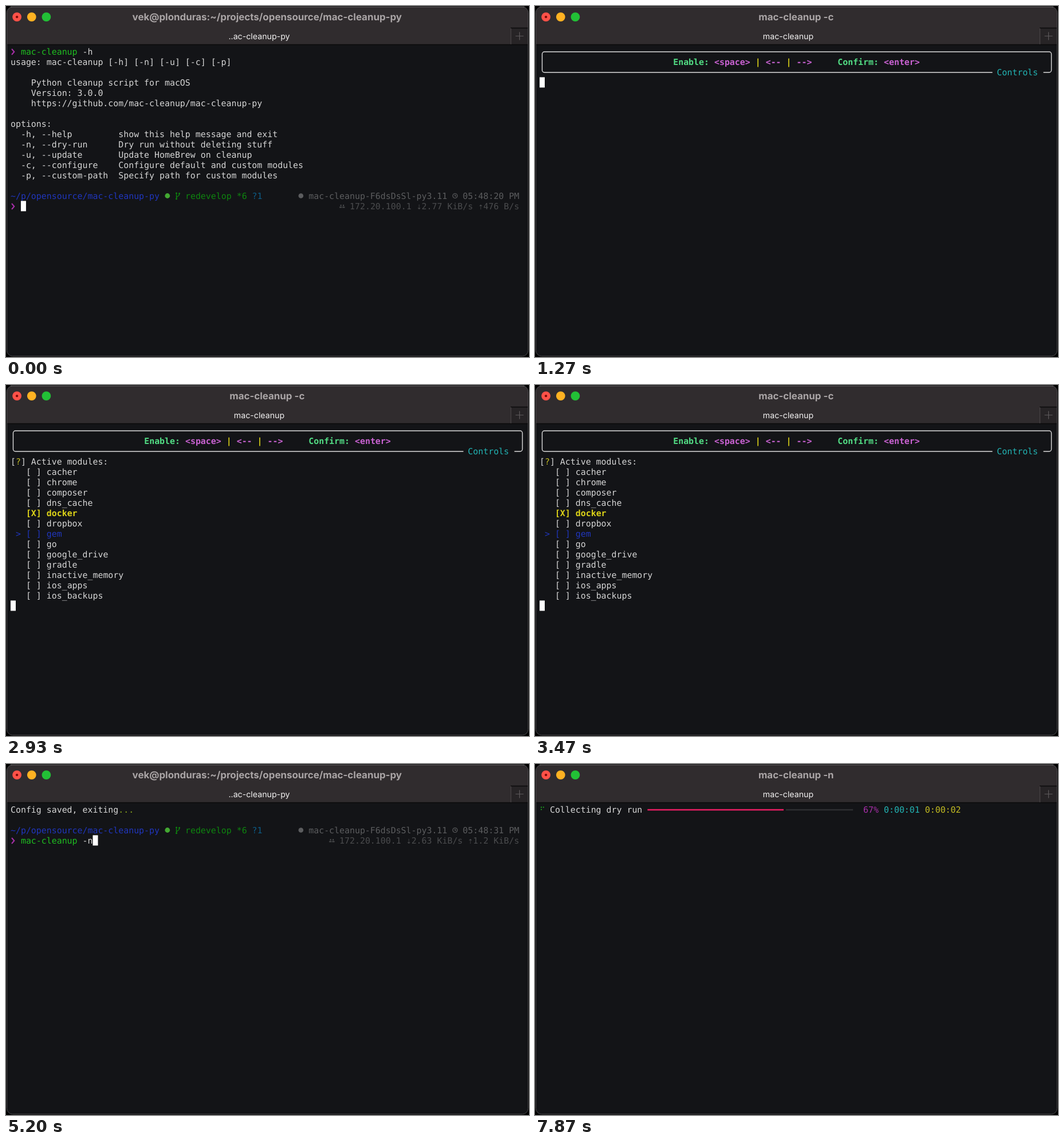
An HTML page that plays this animation: 913 by 613 pixels, repeating every 8 s.

```html
<!DOCTYPE html>
<html lang="en">
<head>
<meta charset="utf-8">
<title>Terminal session</title>
<style>
html, body { margin: 0; width: 100%; height: 100%; overflow: hidden; background: #000; }
svg { display: block; width: 913px; height: 613px; }
text { white-space: pre; text-rendering: geometricPrecision; }
.mono { font: 14.9px "DejaVu Sans Mono", monospace; }
.bold { font-weight: 700; }
.ui { font-family: Inter, sans-serif; text-anchor: middle; }
</style>
</head>
<body>
<svg viewBox="0 0 913 613">
  <rect x="1.5" y="1.5" width="910" height="610" rx="10" fill="#131417"/>
  <path d="M1.5 67V11.5a10 10 0 0 1 10-10H901.5a10 10 0 0 1 10 10V67Z" fill="#302c2e"/>
  <path d="M881.5 38.5H911V67H881.5Z" fill="#272426"/>
  <path d="M2 67.5H911M881 38.5H911" stroke="#0b0a0b" stroke-width="1.4"/>
  <path d="M881.5 39V67" stroke="#4b4749"/>
  <path d="M889.5 52.5H903.5M896.5 45.5V59.5" stroke="#5d595b" stroke-width="1.2"/>
  <rect x="1.5" y="1.5" width="910" height="610" rx="10" fill="none" stroke="#4c4b4d"/>
  <path d="M8 1.5H905" stroke="#6b696a"/>
  <circle cx="19.1" cy="19.1" r="7.9" fill="#ff5148"/>
  <circle cx="19.1" cy="19.1" r="2.2" fill="#7c0c08"/>
  <circle cx="44.8" cy="19.1" r="7.9" fill="#ffb222"/>
  <circle cx="70.4" cy="19.1" r="7.9" fill="#22c036"/>
  <text id="title" class="ui" x="455.8" y="24.6" font-size="16.9" font-weight="700" fill="#aaa5a6"/>
  <text id="tab" class="ui" x="442" y="58" font-size="14.2" fill="#f3f2f2"/>
  <g id="screen" class="mono"></g>
</svg>
<script>
const LOOP = 8000, CELL = 8.97, LINE = 18;
const C = {
  text: '#d6d6d6', gray: '#5c5d5f', dim: '#4b4c4e', blue: '#2036bd', green: '#0e850f',
  cmd: '#1fbd20', magenta: '#a82fa9', teal: '#0d5c87', cyan: '#22b5b5', yellow: '#c4bd22',
  lime: '#52dc84', pink: '#c962d2', gold: '#dcd218'
};
const HOME = ['vek@plonduras:~/projects/opensource/mac-cleanup-py', '..ac-cleanup-py'];
const app = flag => ['mac-cleanup ' + flag, 'mac-cleanup'];
const MODULES = ('adobe android brew cacher chrome composer dns_cache docker dropbox gem go ' +
  'google_drive gradle inactive_memory ios_apps ios_backups').split(' ');
const DOCKER = MODULES.indexOf('docker');
const HELP = [
  'usage: mac-cleanup [-h] [-n] [-u] [-c] [-p]', '',
  '    Python cleanup script for macOS', '    Version: 3.0.0',
  '    https://github.com/mac-cleanup/mac-cleanup-py', '', 'options:',
  '  -h, --help         show this help message and exit',
  '  -n, --dry-run      Dry run without deleting stuff',
  '  -u, --update       Update HomeBrew on cleanup',
  '  -c, --configure    Configure default and custom modules',
  '  -p, --custom-path  Specify path for custom modules'
];
// Left-column dots are bits 1, 2, 4; right-column dots are bits 8, 16, 32.
const SPINNER = [...'⠋⠙⠹⠸⠼⠴⠦⠧⠇⠏'].map(c => c.charCodeAt(0) - 0x2800);

const px = col => +(8 + col * CELL).toFixed(2);
const mid = row => 79.5 + row * LINE;
const esc = s => s.replace(/&/g, '&amp;').replace(/</g, '&lt;');

function put(col, row, str, fill = C.text, bold = false) {
  return `<text x="${px(col)}" y="${84.6 + row * LINE}" fill="${fill}"${bold ? ' class="bold"' : ''}>${esc(str)}</text>`;
}
function block(col, row) {
  return `<rect x="${px(col)}" y="${70.4 + row * LINE}" width="9" height="18" fill="#fff"/>`;
}
function stroke(d, color, width, row = 0, col = 0) {
  return `<path transform="translate(${px(col)} ${mid(row)})" d="${d}" fill="none" stroke="${color}" stroke-width="${width}"/>`;
}
function dot(x, y, r, fill) {
  return `<circle cx="${x}" cy="${y}" r="${r}" fill="${fill}"/>`;
}

function command(row, cmd) {
  return stroke('M2 -4.5L6.3 0.5L2 5.5', C.magenta, 2, row) +
    put(2, row, cmd.slice(0, 11), C.cmd) + put(14, row, cmd.slice(12));
}

function prompt(row, cmd, time, down, up) {
  const net = 99 - up.length - down.length - 18;
  const y = mid(row);
  return put(0, row, '~/p/opensource/mac-cleanup-py', C.blue) +
    dot(px(30) + 4.7, y, 4.4, '#43a832') +
    stroke('M2.5 -3V4M7.5 -2.5C7.5 1.5 2.5 0 2.5 4', C.green, 1.3, row, 32) +
    [[2.5, -4.5], [7.5, -4], [2.5, 5.2]].map(p => dot(px(32) + p[0], y + p[1], 1.5, C.green)).join('') +
    put(34, row, 'redevelop', C.green) + put(44, row, '*6', C.green) + put(47, row, '?1', C.teal) +
    dot(px(56) + 4.5, y, 4.3, C.gray) + put(58, row, 'mac-cleanup-F6dsDsSl-py3.11', C.gray) +
    stroke('M0.5 0a4 4 0 1 0 8 0a4 4 0 1 0 -8 0M4.5 -2.5V0.3H6.5', C.gray, 1.2, row, 86) +
    put(88, row, time, C.gray) +
    stroke('M2.5 -2.5V0M7 -2.5V0M0 2H4.2M5.2 2H9.4', C.dim, 2, row + 1, net) +
    put(net + 2, row + 1, '172.20.100.1', C.dim) +
    put(net + 15, row + 1, '⇣', C.dim) + put(net + 16, row + 1, down, C.dim) +
    put(98 - up.length, row + 1, '⇡', C.dim) + put(99 - up.length, row + 1, up, C.dim) +
    command(row + 1, cmd) + block(2 + cmd.length, row + 1);
}

function help() {
  return command(0, 'mac-cleanup -h') + HELP.map((s, i) => put(0, i + 1, s)).join('');
}

function panel() {
  const keys = [
    [26, 'Enable:', C.lime], [34, '<space>', C.pink], [42, '|', C.gold], [44, '<--', C.pink],
    [48, '|', C.gold], [50, '-->', C.pink], [58, 'Confirm:', C.lime], [67, '<enter>', C.pink]
  ];
  return '<path d="M798.5 116H16.5a4 4 0 0 1 -4 -4V84a4 4 0 0 1 4 -4H897.5a4 4 0 0 1 4 4V112a4 4 0 0 1 -4 4H887.5" fill="none" stroke="#dcdcdc" stroke-width="1.4"/>' +
    keys.map(([col, s, color]) => put(col, 1, s, color, true)).join('') +
    put(89, 2, 'Controls', C.cyan);
}

function menu(current, checked) {
  const first = Math.max(0, Math.min(current - 6, MODULES.length - 13));
  let out = put(0, 3, '[ ] Active modules:') + put(1, 3, '?', C.yellow);
  MODULES.slice(first, first + 13).forEach((name, i) => {
    const n = first + i, on = checked && n === DOCKER, here = n === current;
    const color = here ? C.blue : on ? C.gold : C.text;
    if (here) out += put(1, 4 + i, '>', color);
    out += put(3, 4 + i, (on ? '[X] ' : '[ ] ') + name, color, on && !here);
  });
  return out + block(0, 17);
}

function saved() {
  return put(0, 0, 'Config saved, exiting') + put(21, 0, '...', '#8aa51e');
}

function progress(t) {
  const age = t - 5470;
  const done = age < 130 ? 0 : age < 400 ? 1 : 2;
  const halves = Math.floor(80 * done / 3);
  const bits = SPINNER[Math.floor(age / 80) % 10];
  const edge = px(21 + halves / 2);
  let out = '';
  for (let i = 0; i < 6; i++) {
    if (bits >> i & 1) out += dot(i < 3 ? 11 : 14.8, 75.5 + (i % 3) * 4, 1, C.cmd);
  }
  const bar = (a, b, color) => `<path d="M${a} 80H${b}" stroke="${color}" stroke-width="2.6"/>`;
  out += put(2, 0, 'Collecting dry run') + bar(done ? edge + 4 : edge, px(61), '#2d2f31');
  if (done) out += bar(px(21), edge, '#e91e63');
  return out + put(63, 0, ['  0%', ' 33%', ' 67%'][done].slice(1), C.magenta) +
    put(67, 0, done ? '0:00:01' : '-:--:--', C.cyan) +
    put(75, 0, '0:00:0' + Math.floor(age / 1000), C.yellow);
}

function typed(t, start, erase, end, last, flag) {
  return t < start ? '' : 'mac-cleanup -' + (t < erase ? last : t < end ? '' : flag);
}

function scene(t) {
  if (t < 1070) {
    return [HOME, help() + prompt(14, typed(t, 330, 670, 800, 'h', 'c'), '05:48:20 PM', '2.77 KiB/s', '476 B/s')];
  }
  if (t < 1130) return [app('-c'), help() + command(14, 'mac-cleanup -c') + block(0, 15)];
  if (t < 1200) return [app('-c'), block(0, 0)];
  if (t < 1330) return [app('-c'), panel() + block(0, 3)];
  if (t < 3870) {
    const moves = Math.max(0, Math.min(7, Math.floor((t - 1470) / 130)));
    const current = moves + (t >= 2670) + (t >= 2800);
    return [app('-c'), panel() + menu(current, t >= 2530)];
  }
  if (t < 4330) return [HOME, saved() + block(0, 1)];
  if (t < 5330) {
    return [HOME, saved() + prompt(2, typed(t, 4660, 4930, 5070, 'c', 'n'), '05:48:31 PM', '2.63 KiB/s', '1.2 KiB/s')];
  }
  if (t < 5400) return [app('-n'), saved() + command(2, 'mac-cleanup -n')];
  if (t < 5470) return [app('-n'), ''];
  return [app('-n'), progress(t)];
}

const $ = id => document.getElementById(id);
let shown = '';
function render(t) {
  const [[title, tab], body] = scene(t);
  const key = title + body;
  if (key === shown) return;
  shown = key;
  $('title').textContent = title;
  $('tab').textContent = tab;
  $('screen').innerHTML = body;
}

const begin = performance.now();
function tick() {
  render((performance.now() - begin) % LOOP);
  requestAnimationFrame(tick);
}
tick();
</script>
</body>
</html>
```
